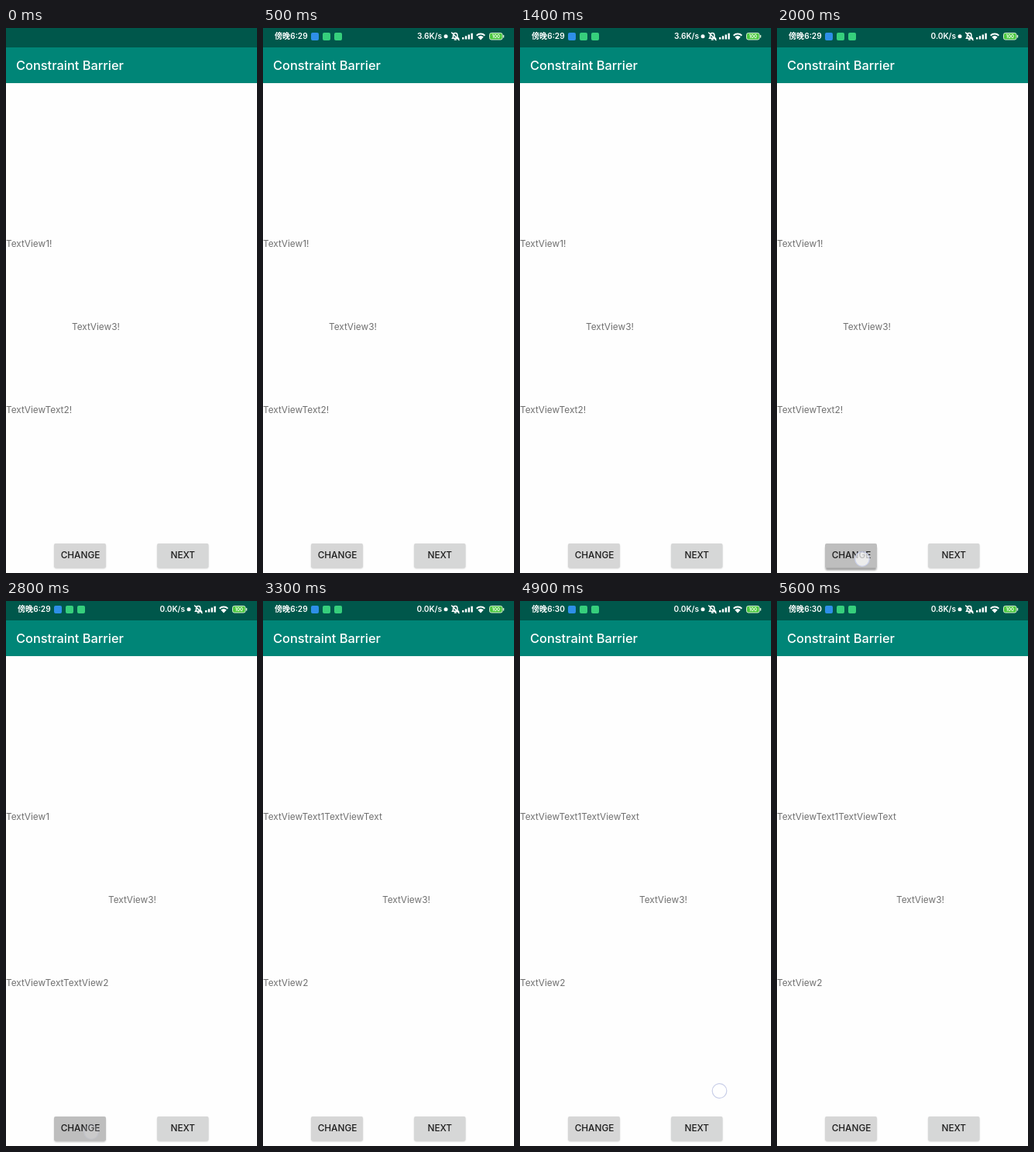
These frames come from a looping animation (324 px wide and 702 px high, 5.7 s). An HTML page:

```html
<!DOCTYPE html>
<html lang="en">
<head>
<meta charset="utf-8">
<title>Constraint Barrier</title>
<style>
  html, body { margin: 0; width: 100%; height: 100%; overflow: hidden; background: #fefefe; }
  svg { display: block; width: 324px; height: 702px; font-family: Inter, "Noto Sans CJK SC", "Noto Sans CJK", sans-serif; }
  .title { font-size: 16.4px; font-weight: 500; fill: #fff; }
  .label { font-size: 11.83px; fill: #707070; }
  .caption { font-size: 11.8px; font-weight: 500; fill: #1c1c1c; text-anchor: middle; }
  .status { font-size: 10.1px; font-weight: 600; fill: #fff; }
  .charge { font-size: 6px; font-weight: 600; fill: #fff; text-anchor: middle; }
  .line { fill: none; stroke: #fff; stroke-width: 1.5; stroke-linecap: round; }
</style>
</head>
<body>
<svg viewBox="0 0 324 702">
  <defs>
    <filter id="soft" x="-20%" y="-40%" width="140%" height="190%"><feGaussianBlur stdDeviation="1.2"/></filter>
  </defs>
  <rect width="324" height="702" fill="#fefefe"/>
  <rect width="324" height="25" fill="#00574b"/>
  <rect y="25" width="324" height="46" fill="#008577"/>
  <text class="title" x="13" y="54">Constraint Barrier</text>

  <g id="bar">
    <text id="clock" class="status" x="15" y="14.3"></text>
    <rect x="62" y="6" width="10" height="10" rx="2" fill="#2e8fe8"/>
    <rect x="77" y="6" width="10" height="10" rx="2" fill="#36cf7c"/>
    <rect x="92" y="6" width="10" height="10" rx="2" fill="#36cf7c"/>
    <text id="speed" class="status" x="231" y="14.3" text-anchor="end"></text>
    <circle cx="236" cy="10.7" r="2.5" fill="#fff"/>
    <path class="line" stroke-width="1.1" d="M244.5 13.2H252.2L250.9 11.6V9.2a2.7 2.7 0 0 0-5.4 0V11.6ZM247.3 15H249.3M243.6 6L253 15.4"/>
    <g id="signal" fill="#fff"></g>
    <path fill="#fff" d="M275 9a8.6 8.6 0 0 1 12 0l-1.3 1.5a6.6 6.6 0 0 0-9.4 0ZM277.3 11.6a5.3 5.3 0 0 1 7.4 0L281 15.4Z"/>
    <rect x="292.5" y="6.5" width="16.5" height="8.5" rx="2.2" fill="#48c83c" stroke="#d8f2d4"/>
    <rect x="309.8" y="9" width="1.4" height="3.5" rx=".6" fill="#d8f2d4"/>
    <text class="charge" x="300.8" y="13">100</text>
  </g>

  <text id="first" class="label" y="282"></text>
  <text id="third" class="label" y="389">TextView3!</text>
  <text id="second" class="label" y="496"></text>

  <rect id="shade" x="62.5" y="665" width="66" height="31" rx="2" filter="url(#soft)"/>
  <rect id="change" x="62" y="664" width="67" height="31.5" rx="2"/>
  <text class="caption" x="96" y="683.3">CHANGE</text>
  <rect x="195.5" y="665" width="65.5" height="31" rx="2" opacity=".22" filter="url(#soft)"/>
  <rect x="195" y="664" width="66.5" height="31.5" rx="2" fill="#d6d7d7"/>
  <text class="caption" x="228.3" y="683.3">NEXT</text>

  <circle id="touch" r="9.3" fill="#fff" fill-opacity=".7" stroke="#c9cfe8" stroke-width="1.2"/>
</svg>
<script>
const LOOP = 5700, STEP = 100, HOLD = 300;
const el = id => document.getElementById(id);
const clamp = v => Math.min(1, Math.max(0, v));
const put = (id, attrs) => {
  for (const key in attrs) el(id).setAttribute(key, attrs[key]);
};

const views = [
  ["TextView1!", "TextViewText2!"],
  ["TextView1", "TextViewTextTextView2"],
  ["TextViewText1TextViewText", "TextView2"]
];
const changeTaps = [1800, 2700];
const lastTap = 4700;

const isHeld = (t, down) => t >= down && t < down + HOLD;
const grow = (t, down) => isHeld(t, down) ? clamp((t - down) / 200) ** 2 : 0;
// The ripple fills quickly, then fades once the finger lifts.
const ripple = (t, down) => clamp((t - down) / 100) * clamp(1 - (t - down - HOLD + STEP) / 400);
const most = (fn, t) => Math.max(...changeTaps.map(down => fn(t, down)));

function draw(t) {
  const [first, second] = views[changeTaps.filter(down => t >= down + HOLD).length];
  el("first").textContent = first;
  el("second").textContent = second;
  const widths = ["first", "second"].map(id => el(id).getComputedTextLength());
  put("third", { x: Math.round(Math.max(...widths)) });

  put("bar", { visibility: t < STEP ? "hidden" : "visible" });
  el("clock").textContent = t < 4500 ? "傍晚6:29" : "傍晚6:30";
  el("speed").textContent = t < 1500 ? "3.6K/s" : t < 5500 ? "0.0K/s" : "0.8K/s";

  const lift = most(grow, t);
  const gray = 214 - 24 * most(ripple, t);
  put("change", { fill: `rgb(${gray},${gray},${gray})` });
  put("shade", { y: 665 + 2.5 * lift, opacity: .22 + .15 * lift });

  const [cx, cy] = t < lastTap ? [110, 684] : [257.5, 631];
  put("touch", { cx, cy, opacity: Math.max(lift, grow(t, lastTap)) });
}

for (let i = 0; i < 4; i++) {
  const height = 2.5 + 1.75 * i;
  el("signal").innerHTML += `<rect x="${257 + 3.8 * i}" y="${14.5 - height}" width="2.4" height="${height}"/>`;
}

const start = performance.now();
function tick() {
  const t = (performance.now() - start) % LOOP;
  draw(Math.floor(t / STEP) * STEP);
  requestAnimationFrame(tick);
}
tick();
</script>
</body>
</html>
```
